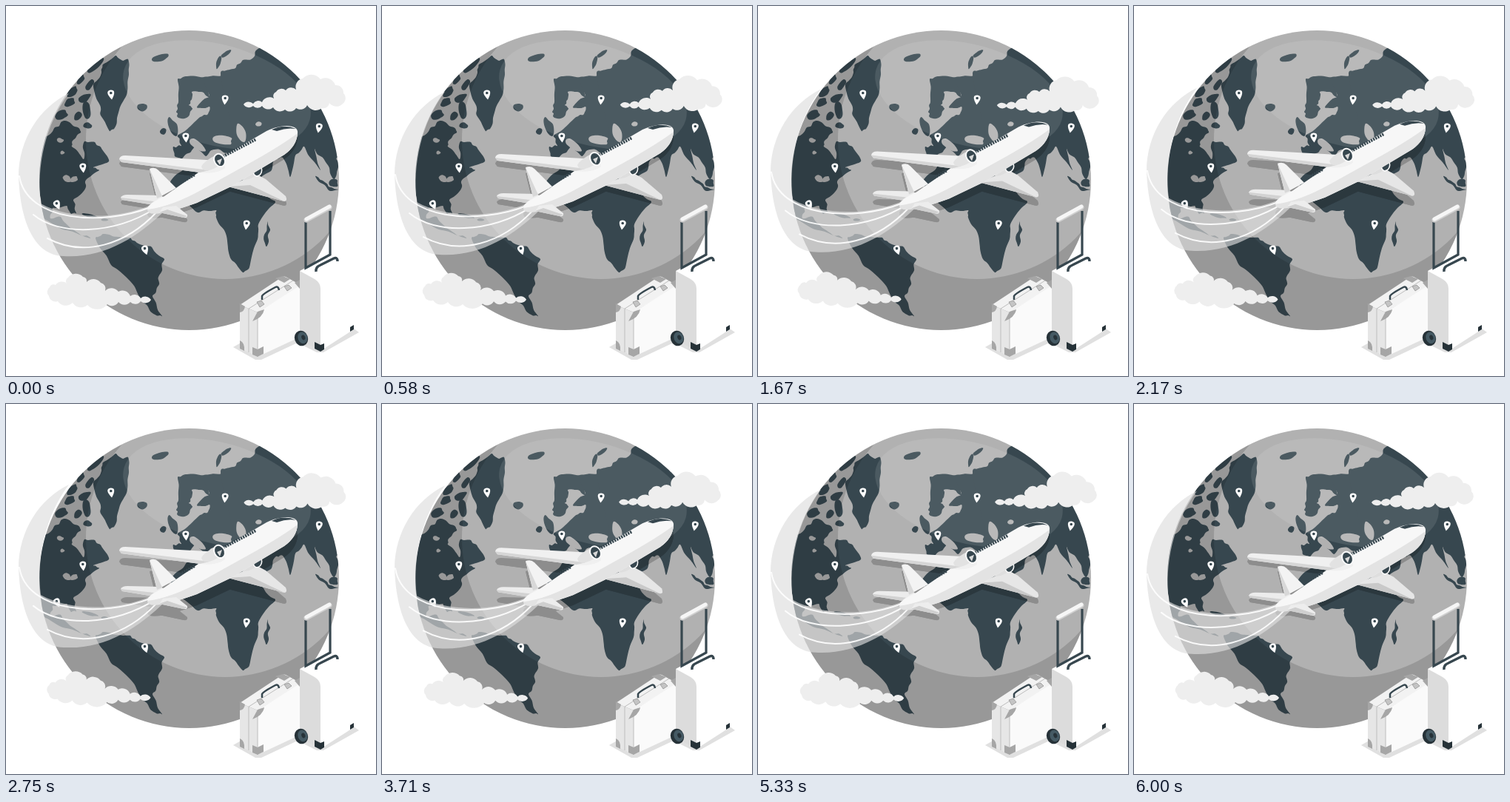
An HTML page for the animation above (6.04 s loop, 500x500 px).

```html
<!DOCTYPE html>
<html lang="en">
<head>
<meta charset="utf-8">
<title>Travel the world</title>
<style>
html, body { margin: 0; width: 100%; height: 100%; overflow: hidden; background: #fff }
svg { display: block; width: 100%; height: 100% }
</style>
</head>
<body>
<svg viewBox="0 0 500 500">
<defs>
  <clipPath id="disc"><circle cx="247.5" cy="235.5" r="202.5"/></clipPath>
  <g id="pin">
    <path d="M0 7.5Q-9-5 0-5.600Q9-5 0 7.500Z" fill="#fff"/>
    <circle cy="-1.5" r="1.8" fill="#37474f"/>
  </g>
  <g id="fan">
    <ellipse rx="8" ry="10" fill="#fafafa"/>
    <ellipse rx="6" ry="8" fill="#37474f"/>
  </g>
  <g id="jet">
    <path d="M300 244L338 227 351 234 378 257Q381 264 376 264Z" fill="#e6e6e6"/>
    <path d="M300 244L376 264 330 242Z" fill="#c9c9c9"/>
    <path d="M316 231Q322 224 338 216L345 224Q322 242 316 231Z" fill="#dedede"/>
    <use href="#fan" transform="translate(340 223) rotate(20) scale(.78)"/>
    <path d="M155 259Q157 255 164 255L209 256 222 264 194 268 157 262Z" fill="#ececec"/>
    <path d="M155 259L157 262 194 268 200 264Z" fill="#d2d2d2"/>
    <path d="M194 220Q201 217 206 222L230 246 204 260Z" fill="#f3f3f3"/>
    <path d="M194 220L204 260 211 257Z" fill="#d8d8d8"/>
    <path d="M191 273Q193 267 214 257L280 211 352 169C376 158 396 161 394 172Q393 189 376 201L304 244 258 266Q191 290 191 273Z" fill="#f7f7f7"/>
    <path d="M191 275Q224 271 265 248L337 208Q374 187 394 172 393 189 376 201L304 244 258 266Q191 290 191 275Z" fill="#e3e3e3"/>
    <path d="M359 167Q376 159 392 166 379 164 366 169Z" fill="#37474f"/>
    <path d="M232 241L255 228M290 205L338 180" stroke="#37474f" stroke-width="4" stroke-dasharray="2.2 1.2" fill="none"/>
    <path d="M153 207Q154 202 161 202L271 208 295 207 296 219Q284 228 262 225L156 211Z" fill="#f0f0f0"/>
    <path d="M153 207L156 211 262 225 275 222Z" fill="#d6d6d6"/>
    <path d="M264 217Q267 210 286 200L294 212Q268 230 264 217Z" fill="#e2e2e2"/>
    <use href="#fan" transform="translate(288.5 208.5) rotate(-28)"/>
    <path d="M285 209L292 206 289 215Z" fill="#d8d8d8"/>
    <path d="M212 272L230 270 245 282Q246 287 240 286L207 279Z" fill="#ededed"/>
    <path d="M207 279L240 286 245 284 218 275Z" fill="#cfcfcf"/>
  </g>
</defs>

<g clip-path="url(#disc)">
  <rect width="500" height="500" fill="#b1b1b1"/>
  <g fill="#37474f">
    <g id="isles"></g>
    <!-- Greenland -->
    <path data-p="148,67 158,74 165,72 166,93 163,120 152,144 146,166 140,169 130,151 127,134 118,106 129,90 131,79"/>
    <!-- North America -->
    <path data-p="38,215 52,178 66,164 80,155 97,164 101,171 90,182 89,190 105,207 106,183 120,184 130,194 139,210 118,218 126,222 109,234 107,247 91,262 95,280 88,281 82,270 63,273 60,287 74,285 82,295 98,307 114,314 77,302 49,284"/>
    <!-- South America -->
    <path data-p="121,314 131,308 153,312 168,313 177,320 196,325 214,342 207,364 207,376 198,392 211,419 203,418 184,399 166,370 142,350"/>
    <!-- Africa -->
    <path data-p="222,238 246,213 283,221 324,221 348,249 364,265 341,295 340,315 329,353 320,360 304,342 298,311 284,286 284,276 259,279 230,258"/>
    <path data-p="354,291 357,303 352,325 349,309"/>
    <!-- Scandinavia -->
    <path data-p="232,99 243,95 274,96 275,123 261,116 251,116 251,126 247,134 252,139 244,151 233,151 230,143 233,130"/>
    <!-- Europe -->
    <path data-p="268,98 300,90 325,140 318,203 302,199 281,194 270,203 256,188 249,198 238,206 228,203 226,190 237,189 232,175 261,151 272,147 275,136 258,137 275,122"/>
    <!-- Asia -->
    <path data-p="290,92 310,84 320,73 334,70 339,59 365,45 475,70 480,180 447,205 449,218 443,234 432,211 417,193 425,222 403,190 391,202 384,231 374,205 365,206 358,223 337,237 310,200"/>
    <path data-p="418,230 428,236 436,244 449,248 436,249"/>
  </g>
  <g id="lakes" fill="#b1b1b1"></g>
  <path d="M0 0H500V500H0ZM108 181a188 188 0 0 0 376 0a188 188 0 0 0-376 0Z" fill-rule="evenodd" opacity=".14"/>
  <ellipse cx="285" cy="120" rx="130" ry="68" transform="rotate(15 285 120)" fill="#fff" opacity=".1"/>
</g>
<use href="#jet" y="6" style="filter:brightness(0);opacity:.2"/>
<g id="pins"></g>

<g id="flight">
  <path d="M85 118C45 137 17 181 17 230C19 287 36 337 78 338C132 341 177 314 217 274L198 268C151 289 87 289 47 267C41 217 53 160 85 118Z" fill="#ddd" opacity=".65"/>
  <g fill="none" stroke="#fff" stroke-width="2" stroke-linecap="round" opacity=".9">
    <path d="M18 230C28 291 129 298 195 272"/>
    <path d="M37 282C72 311 145 309 201 274"/>
    <path d="M56 314C105 340 162 323 204 278"/>
  </g>
  <use href="#jet"/>
</g>

<g id="clouds" fill="#eee">
  <path data-puff="321,133 334,132 346,130 362,125 365,116 378,114 392,113 401,98 425,99 445,107 456,118 455,132 437,131 427,138 407,134 392,138 377,140 361,137 346,135 334,135"/>
  <path data-puff="58,392 59,380 67,377 82,375 84,367 104,366 109,373 128,374 134,385 152,386 168,392 182,395 196,397 182,399 168,400 152,400 137,403 110,404 90,401 70,399"/>
</g>

<!-- luggage -->
<path d="M307 461L326 450 397 436H470L477 441 429 468H420L394 455 345 478H337Z" fill="#e0e0e0"/>
<path d="M316 404L372 367Q376 364 380 367L400 378 340 414Z" fill="#f2f2f2"/>
<path d="M316 404L340 414V474L316 462Z" fill="#e6e6e6"/>
<path d="M340 414L400 376V446L340 474Z" fill="#fafafa"/>
<path d="M328 468V409L388 371M340 414V474" fill="none" stroke="#bdbdbd"/>
<path d="M316 402L323 406Q322 413 316 414ZM340 413L349 410Q347 421 333 426ZM316 452Q323 455 322 466L316 463ZM333 461L340 464 348 460V470L340 474 333 471ZM364 368L374 365 384 369 376 374ZM390 374L397 370V382Z" fill="#a6a6a6"/>
<path d="M339 400L345 398 349 403 343 407ZM376 379L382 377 386 381 380 385Z" fill="#c4c4c4" stroke="#8d8d8d" stroke-width=".7"/>
<path d="M346 397V392Q347 389 364 380 368 378 369 384" fill="none" stroke="#37474f" stroke-width="2.5"/>
<path d="M397 358L441 334Q445 332 449 334L464 342Q470 345 470 351V437L425 466Z" fill="#fff"/>
<path d="M397 358L417 369Q425 374 425 382V466L397 451Z" fill="#dcdcdc"/>
<path d="M405 292V354L438 336V277" fill="none" stroke="#37474f" stroke-width="3.2"/>
<path d="M406 289L437 272" stroke="#d0d0d0" stroke-width="7" stroke-linecap="round"/>
<path d="M406 288L437 271" stroke="#f6f6f6" stroke-width="5" stroke-linecap="round"/>
<path d="M419 359Q418 353 425 350L443 341Q448 339 448 345" fill="none" stroke="#37474f" stroke-width="3.5"/>
<path d="M417 454L425 458 430 456V464L425 467 417 463ZM465 434L470 431V437L465 440Z" fill="#263238"/>
<g transform="translate(399 449) rotate(-20)" fill="#263238">
  <ellipse rx="9" ry="10.5"/>
  <ellipse cx="2" rx="6.5" ry="8" fill="#455a64"/>
  <ellipse cx="3" rx="2.5" ry="3.5"/>
</g>
</svg>
<script>
const LOOP = 6040;
const byId = id => document.getElementById(id);
const parse = list => list.split(' ').map(s => s.split(',').map(Number));
const noise = n => Math.sin(n * 12.9898) * 43758.5453 % 1;

// Closed Catmull-Rom curve
function smooth(p) {
  const at = i => p[(i + p.length) % p.length];
  return 'M' + p[0] + p.map((b, i) => {
    const a = at(i - 1), c = at(i + 1), d = at(i + 2);
    return 'C' + [0, 1].map(k => b[k] + (c[k] - a[k]) / 6)
      + ' ' + [0, 1].map(k => c[k] - (d[k] - b[k]) / 6) + ' ' + c;
  }).join('') + 'Z';
}

// Ragged coast: each edge gets two slightly displaced inner points
function coast(p) {
  return smooth(p.flatMap((a, i) => {
    const b = p[(i + 1) % p.length], dx = b[0] - a[0], dy = b[1] - a[1];
    const inner = [1, 2].map(k => {
      const bend = noise(a[0] + a[1] * k) * Math.min(.13, 2 / Math.hypot(dx, dy));
      return [a[0] + dx * k / 3 - dy * bend, a[1] + dy * k / 3 + dx * bend];
    });
    return [a, ...inner];
  }));
}

// Cloud outline: neighbouring points joined by outward arcs
function puff(p) {
  return 'M' + p[0] + p.map((a, i) => {
    const b = p[(i + 1) % p.length];
    const r = Math.hypot(b[0] - a[0], b[1] - a[1]) * .65;
    return `A${r} ${r} 0 0 1 ${b}`;
  }).join('');
}

// Uneven oval: centre, radii, tilt in degrees
function blob([x, y, rx, ry, tilt]) {
  const pts = Array.from({ length: 8 }, (_, i) => {
    const a = i * Math.PI / 4, s = 1 + .28 * noise(x + y + i);
    return [rx * s * Math.cos(a), ry * s * Math.sin(a)];
  });
  return `<path d="${smooth(pts)}" transform="translate(${x} ${y}) rotate(${tilt})"/>`;
}

document.querySelectorAll('[data-p]').forEach(e => e.setAttribute('d', coast(parse(e.dataset.p))));
document.querySelectorAll('[data-puff]').forEach(e => e.setAttribute('d', puff(parse(e.dataset.puff))));

byId('isles').innerHTML = [
  [184, 138, 7, 5, 0], [210, 70, 12, 4, -15], [287, 77, 3, 10, 15], [296, 65, 8, 3, -35],
  [121, 81, 17, 4, -40], [101, 100, 8, 4, -45], [90, 116, 9, 4, -40], [114, 106, 8, 4, -50],
  [105, 125, 9, 6, -30], [110, 141, 5, 11, -10], [86, 131, 9, 5, -25], [75, 147, 9, 5, -25],
  [97, 149, 7, 5, -50], [110, 161, 6, 4, 10], [115, 284, 11, 2, 15], [133, 289, 5, 2, 0],
  [225, 162, 5, 12, -20], [213, 170, 4, 4, 0], [443, 239, 6, 5, 0]
].map(blob).join('');
byId('lakes').innerHTML = [
  [83, 233, 6, 4, 40], [92, 234, 5, 3, -20], [73, 181, 4, 3, 0], [76, 198, 3, 3, 0],
  [293, 181, 13, 5, 8], [318, 172, 5, 11, -20], [259, 188, 11, 5, 35], [342, 160, 4, 3, 0]
].map(blob).join('');
byId('pins').innerHTML = [
  [142, 119, -8], [104, 218, -6], [69, 268, -25], [243, 177, -5],
  [296, 126, 5], [423, 164, 10], [325, 295, 8], [188, 329, -18]
].map(([x, y, a]) => `<use href="#pin" transform="translate(${x} ${y}) rotate(${a})"/>`).join('');

function draw() {
  const t = performance.now() % LOOP / LOOP;
  const lift = 10 * (1 - Math.abs(1 - 2 * t));
  const sway = t < .25 ? 4 * t : t < .75 ? 2 - 4 * t : 4 * t - 4;
  byId('flight').setAttribute('transform', `translate(0 ${-lift})`);
  byId('clouds').setAttribute('transform', `rotate(${sway} 250 250)`);
  requestAnimationFrame(draw);
}
draw();
</script>
</body>
</html>
```
